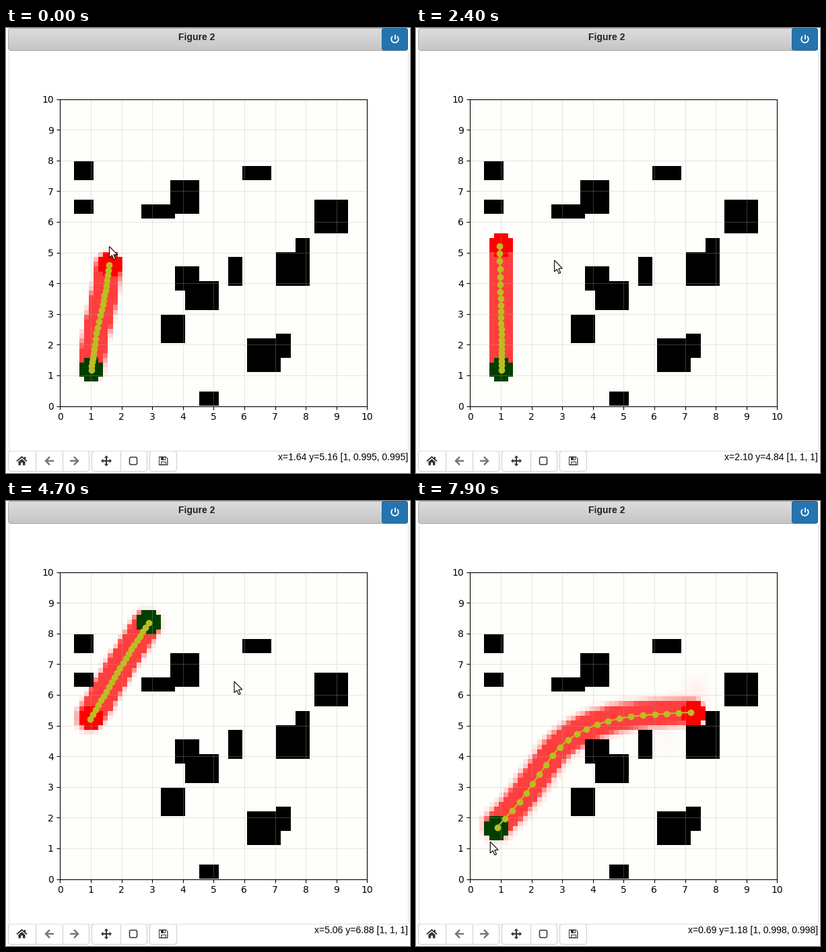
Write a matplotlib script that moves like this. It is 600x661 px and loops after 8000 ms.

```python
import numpy as np
import matplotlib.pyplot as plt
from matplotlib.animation import FuncAnimation
from matplotlib.patches import Arc, FancyBboxPatch, Polygon, Rectangle

W, H, DPI = 600, 661, 100
PX = 72 / DPI                                # points per pixel
LEFT, TOP, SIZE = 80.3, 105.5, 456
BOTTOM = TOP + SIZE
N = 64                                       # grid cells per side
CELL = SIZE / N
FRAMES, STEP = 80, 100

PAPER = (0.997, 0.998, 0.983)
PINK = (1, 0.245, 0.245)
GREEN = (0, 0.25, 0)
RED = (1, 0, 0)
OLIVE = "#bcbd22"

# obstacles in cells: x0, x1, y0, y1
BLOCKS = [
    (3, 7, 47, 51), (3, 7, 40, 43), (17, 24, 39, 42), (23, 29, 40, 47),
    (38, 44, 47, 50), (53, 60, 36, 43), (49, 52, 32, 35), (45, 52, 25, 32),
    (35, 38, 25, 31), (24, 29, 24, 29), (26, 33, 20, 26), (21, 26, 13, 19),
    (39, 46, 7, 14), (45, 48, 10, 15), (29, 33, 0, 3),
]

# start time, spread of the prediction in cells, knots in pixels
PLANS = [
    (0.0, 0.28, [(126.5, 507.5), (130, 483), (135, 450), (143, 414),
                 (148.5, 384), (153.2, 352)]),
    (1.3, 0.35, [(126.5, 507.5), (162, 444), (201, 376), (240, 311)]),
    (2.2, 0.05, [(124 + 2.5, 507.5), (127, 463), (125.5, 402), (124, 323.5)]),
    (3.5, 0.35, [(182, 414.5), (172, 398), (158, 380), (146, 360),
                 (135, 341), (125, 323.5)]),
    (4.5, 0.4, [(211.5, 181), (182, 227), (153, 276), (125, 323.5)]),
    (5.2, 0.45, [(211.5, 181), (244.5, 195), (276, 208.5), (303, 226),
                 (328.5, 248), (354.5, 270.5), (380.5, 294), (408.3, 316)]),
    (6.7, 0.6, [(120.5, 484.5), (153.5, 447), (183, 406), (213.5, 365.5),
                (253, 338.5), (302, 323), (354.5, 317), (408.3, 314)]),
]

# pointer: time, x, y
POINTER = np.array([
    (0.0, 153.5, 324.5), (0.22, 153.5, 324.5), (0.5, 170, 322),
    (0.8, 209, 315), (1.0, 234, 311.5), (1.14, 237.5, 311),
    (1.2, 231.5, 310.5), (1.4, 190, 313), (1.6, 148, 318),
    (1.84, 122.5, 322), (2.04, 122.5, 322), (2.2, 137, 330),
    (2.34, 174.6, 339.3), (2.4, 205.5, 345), (2.6, 226, 322),
    (2.9, 204, 256), (3.1, 194, 330), (3.3, 181, 411), (3.44, 180.5, 413),
    (3.6, 184, 340), (3.8, 189, 237), (3.95, 198, 202), (4.04, 204.2, 184.3),
    (4.22, 204.2, 184.3), (4.34, 210.5, 179.5), (4.42, 210.5, 179.5),
    (4.6, 290, 232), (4.8, 388, 304), (4.9, 406.5, 314), (4.97, 406.5, 314),
    (5.1, 345, 316), (5.34, 204.2, 334.3), (5.4, 192, 347), (5.6, 160, 400),
    (5.8, 138, 446), (6.0, 125, 472), (6.12, 119, 484),
    (6.24, 113.3, 488.4), (7.42, 113.3, 488.4), (7.6, 111, 497),
    (7.84, 110.3, 506.2), (8.0, 110.3, 506.2),
])
LAG = 0.06                                   # readout trails the pointer

WHITE, AT_GOAL, AT_START = "1, 1, 1", "1, 0, 0", "0, 0.251, 0"
VALUES = [
    (0, "1, 0.995, 0.995"), (0.3, WHITE), (1.1, AT_GOAL), (1.3, WHITE),
    (2.1, AT_GOAL), (2.3, WHITE), (3.5, AT_START), (3.6, WHITE),
    (4.4, AT_START), (4.5, WHITE), (4.9, AT_GOAL), (5.1, WHITE),
    (7.5, AT_START), (7.7, "1, 0.998, 0.998"),
]


def curve(knots, count):
    """Hermite spline through evenly timed knots."""
    p = np.array(knots, float)
    m = np.gradient(p, axis=0)
    u = np.linspace(0, len(p) - 1, count)
    i = np.minimum(u.astype(int), len(p) - 2)
    s = (u - i)[:, None]
    return ((1 + 2 * s) * (1 - s) ** 2 * p[i] + s * (1 - s) ** 2 * m[i]
            + s ** 2 * (3 - 2 * s) * p[i + 1] - s ** 2 * (1 - s) * m[i + 1])


def to_cells(pts):
    return np.column_stack([(pts[:, 0] - LEFT) / CELL,
                            (BOTTOM - pts[:, 1]) / CELL])


def stamp(cells):
    """Mask of the robot's footprint (5 x 5 without corners) at each point."""
    mask = np.zeros((N, N), bool)
    c = np.floor(cells).astype(int)
    for dx in range(-2, 3):
        for dy in range(-2, 3):
            if abs(dx) + abs(dy) < 4:
                x, y = np.clip(c + (dx, dy), 0, N - 1).T
                mask[y, x] = True
    return mask


def paint(knots, spread, hazy):
    rng = np.random.default_rng(4)
    cells = to_cells(curve(knots, 300))
    shifts = rng.normal(0, spread, (60, 2))
    prob = np.mean([stamp(cells + d) for d in shifts], axis=0)
    prob = np.clip(1.25 * prob, 0, 1)
    if hazy:
        y, x = np.mgrid[:N, :N] + 0.5
        haze = 0.07 * np.exp(-((x - 47) / 2.5) ** 2 - ((y - 39) / 3) ** 2)
        haze += 0.025 * np.exp(-((x - 41) / 3) ** 2 - ((y - 30) / 3) ** 2)
        prob = np.maximum(prob, haze)
    prob = prob[..., None]
    img = (1 - prob) * PAPER + prob * np.array(PINK)
    for x0, x1, y0, y1 in BLOCKS:
        img[y0:y1, x0:x1] = 0
    img[stamp(cells[-1:])] = RED
    img[stamp(cells[:1])] = GREEN
    return img


def latest(items, t):
    return [it for it in items if it[0] <= t + 1e-6][-1]


def pointer_at(t):
    return np.array([np.interp(t, POINTER[:, 0], POINTER[:, k])
                     for k in (1, 2)])


fig = plt.figure(figsize=(W / DPI, H / DPI), dpi=DPI, facecolor="white")

# plot
ax = fig.add_axes([LEFT / W, 1 - BOTTOM / H, SIZE / W, SIZE / H])
scenes = [(t, paint(k, s, t > 6), to_cells(curve(k, 22)) * 10 / N)
          for t, s, k in PLANS]
image = ax.imshow(scenes[0][1], origin="lower", extent=(0, 10, 0, 10),
                  interpolation="nearest", aspect="auto")
route, = ax.plot([], [], "o-", color=OLIVE, lw=1.5, ms=6)
ax.set(xlim=(0, 10), ylim=(0, 10), xticks=range(11), yticks=range(11))
ax.tick_params(labelsize=10, labelfontfamily="DejaVu Sans")
ax.grid(alpha=0.3)

# window frame, in pixel coordinates
ui = fig.add_axes([0, 0, 1, 1], zorder=3)
ui.axis("off")


def box(x, y, w, h, fc, ec, r=4, lw=1, **kw):
    return ui.add_patch(FancyBboxPatch(
        (x + r, y + r), w - 2 * r, h - 2 * r,
        boxstyle=f"round,pad={r}", fc=fc, ec=ec, lw=lw * PX, **kw))


def stroke(pts, color, lw=1, **kw):
    x, y = zip(*pts)
    return ui.plot(x, y, color=color, lw=lw * PX, solid_capstyle="butt",
                   solid_joinstyle="miter", **kw)


def shape(pts, color):
    ui.add_patch(Polygon(pts, fc=color, ec="none"))


def title_bar():
    ramp = np.linspace(0.87, 0.775, 33)[:, None, None] * np.ones((1, 1, 3))
    bar = ui.imshow(ramp, extent=(3, 597, 33.5, 0), aspect="auto", zorder=0)
    bar.set_clip_path(box(3.5, 0.5, 593, 33, "none", "#aaaaaa"))
    ui.text(283, 14, "Figure 2", family="Liberation Sans", weight="bold",
            size=14 * PX, color="#222222", ha="center", va="center")
    box(558.5, 0.5, 38, 32.5, "#2474b0", "#1f6699", r=3, zorder=2)
    ui.add_patch(Arc((577.5, 16.5), 10.5, 10.5, theta1=-50, theta2=230,
                     ec="white", lw=1.8 * PX, zorder=3))
    stroke([(577.5, 10), (577.5, 16.5)], "white", 1.8, zorder=3)


def toolbar():
    ink, dim, edge = "#333333", "#777777", "#cccccc"
    stroke([(3.5, 34), (3.5, 627.5), (596.5, 627.5), (596.5, 34)], "#dddddd")
    for x, w in ((3.5, 120), (127.5, 82), (213.5, 40)):
        box(x, 628.5, w, 30, "white", edge)
    for x in (43.5, 83.5, 169.5):
        stroke([(x, 629), (x, 658)], edge)
    # home
    stroke([(16, 643.5), (23.5, 637), (31, 643.5)], ink, 1.9)
    shape([(27, 637), (29, 637), (29, 642), (27, 640)], ink)
    shape([(18.5, 644.3), (23.5, 640), (28.5, 644.3), (28.5, 649.5),
           (25, 649.5), (25, 645.5), (22, 645.5), (22, 649.5),
           (18.5, 649.5)], ink)
    # back and forward
    for cx, d in ((64, 1), (102, -1)):
        stroke([(cx - 5 * d, 643), (cx + 7 * d, 643)], dim, 2.5)
        stroke([(cx + d, 637), (cx - 5 * d, 643), (cx + d, 649)], dim, 2.5)
    # pan
    cx, cy = 149, 643
    stroke([(cx - 6, cy), (cx + 6, cy)], ink, 2)
    stroke([(cx, cy - 6), (cx, cy + 6)], ink, 2)
    for dx, dy in ((1, 0), (-1, 0), (0, 1), (0, -1)):
        shape([(cx + 8 * dx, cy + 8 * dy),
               (cx + 4.6 * dx + 3.2 * dy, cy + 4.6 * dy + 3.2 * dx),
               (cx + 4.6 * dx - 3.2 * dy, cy + 4.6 * dy - 3.2 * dx)], ink)
    # zoom
    box(183.5, 637.5, 11, 11, "none", ink, r=2, lw=1.5)
    # save
    shape([(227, 636.5), (237.5, 636.5), (240.5, 639.5), (240.5, 649.5),
           (227, 649.5)], ink)
    for x, y, w, h, c in ((228.3, 637.8, 10, 10.4, "white"),
                          (229.8, 637, 7, 4.6, ink),
                          (233.8, 637.8, 1.8, 2.8, "white"),
                          (229.8, 643.6, 8, 5.2, ink),
                          (231, 644.8, 5.6, 3.5, "white")):
        ui.add_patch(Rectangle((x, y), w, h, fc=c, ec="none"))
    shape([(237.6, 638), (239.2, 639.8), (239.2, 648.3), (238, 648.3)],
          "white")


title_bar()
toolbar()
readout = ui.text(597, 642, "", family="Liberation Sans", size=14 * PX,
                  color="black", ha="right", va="baseline")
ARROW = np.array([(0, 0), (0, 16.8), (3.9, 13.2), (6.6, 19.6), (9.2, 18.5),
                  (6.5, 12.3), (11.8, 12)])
cursor = ui.add_patch(Polygon(ARROW, fc="white", ec="#111111", lw=1.2 * PX,
                              zorder=5))
ui.set(xlim=(0, W), ylim=(H, 0))


def draw(i):
    t = i * STEP / 1000
    _, img, pts = latest(scenes, t)
    image.set_data(img)
    route.set_data(*pts.T)
    cursor.set_xy(ARROW + pointer_at(t))
    x, y = pointer_at(t - LAG) + 1.5
    x, y = (x - LEFT) * 10 / SIZE, (BOTTOM - y) * 10 / SIZE
    readout.set_text(f"x={x:.2f} y={y:.2f} [{latest(VALUES, t)[1]}]")
    return image, route, cursor, readout


anim = FuncAnimation(fig, draw, frames=FRAMES, interval=STEP, repeat=True,
                     repeat_delay=0)
plt.show()
```
